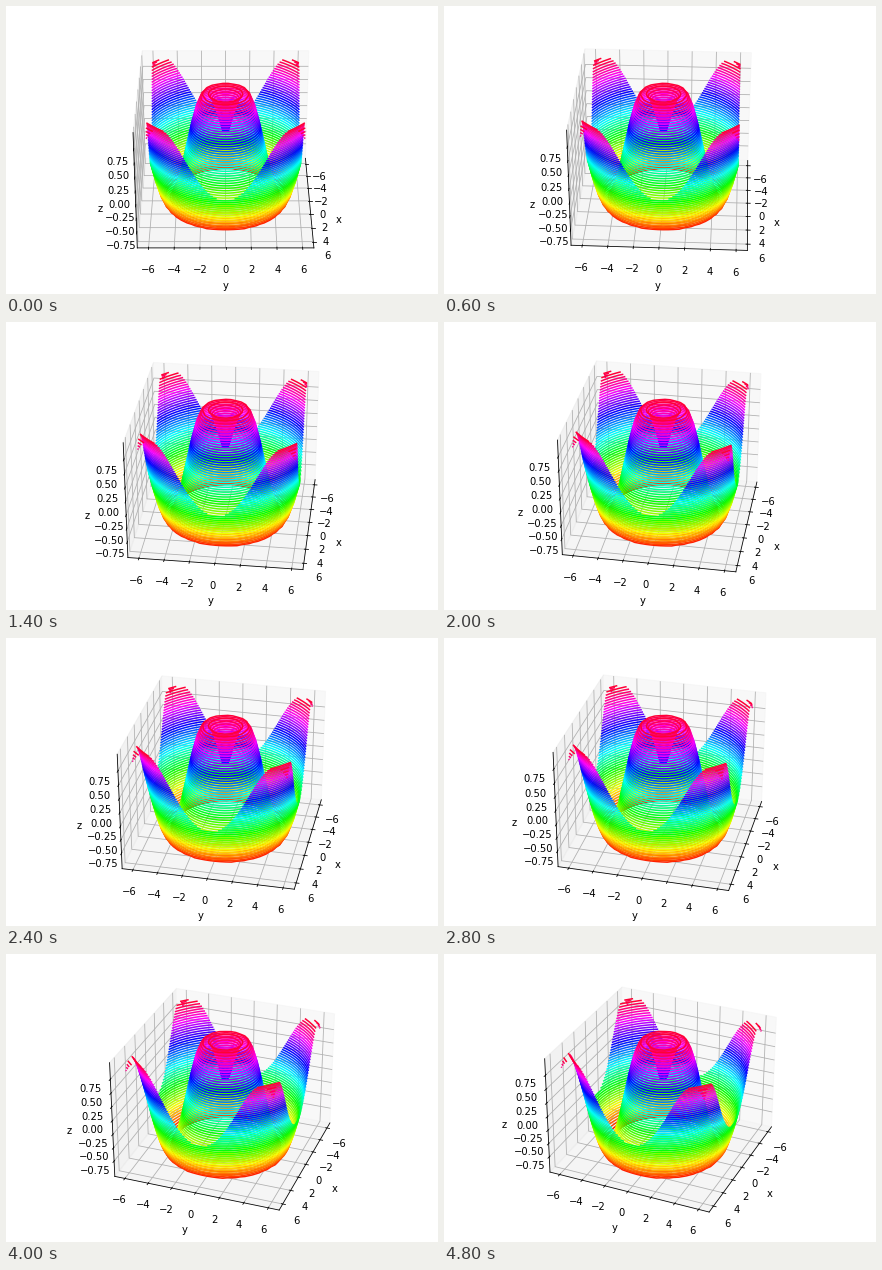
Recreate the animation shown at these times as a matplotlib script. Size 432 px wide and 288 px high, loop 5 s.

```python
import matplotlib.pyplot as plt
import numpy as np
from matplotlib.animation import FuncAnimation

WIDTH, HEIGHT, DPI = 432, 288, 72
FRAMES, INTERVAL = 25, 200
MARGIN = 10.8  # pixels around the axes


def padded(low, high, share):
    pad = (high - low) * share
    return low - pad, high + pad


side = np.linspace(-6, 6, 30)
X, Y = np.meshgrid(side, side)
Z = np.sin(np.hypot(X, Y))

fig = plt.figure(figsize=(WIDTH / DPI, HEIGHT / DPI), dpi=DPI)
left, bottom = MARGIN / WIDTH, MARGIN / HEIGHT
ax = fig.add_axes([left, bottom, 1 - 2 * left, 1 - 2 * bottom], projection="3d")
ax.contour3D(X, Y, Z, 50, cmap="hsv")

ax.set(xlabel="x", ylabel="y", zlabel="z")
ax.set_xticks(range(-6, 7, 2))
ax.set_yticks(range(-6, 7, 2))
ax.set_zticks(np.arange(-0.75, 0.8, 0.25))

span = padded(*padded(-6, 6, 0.05), 1 / 48)
ax.set_xlim(*span)
ax.set_ylim(*span)
ax.set_zlim(*padded(Z.min(), Z.max(), 1 / 48))


def update(frame):
    # A hair above zero keeps the choice of visible walls unambiguous.
    ax.view_init(elev=30, azim=max(frame, 0.001))
    return []


animation = FuncAnimation(fig, update, frames=FRAMES, init_func=lambda: update(0),
                          interval=INTERVAL, repeat=True, repeat_delay=0)
plt.show()
```
